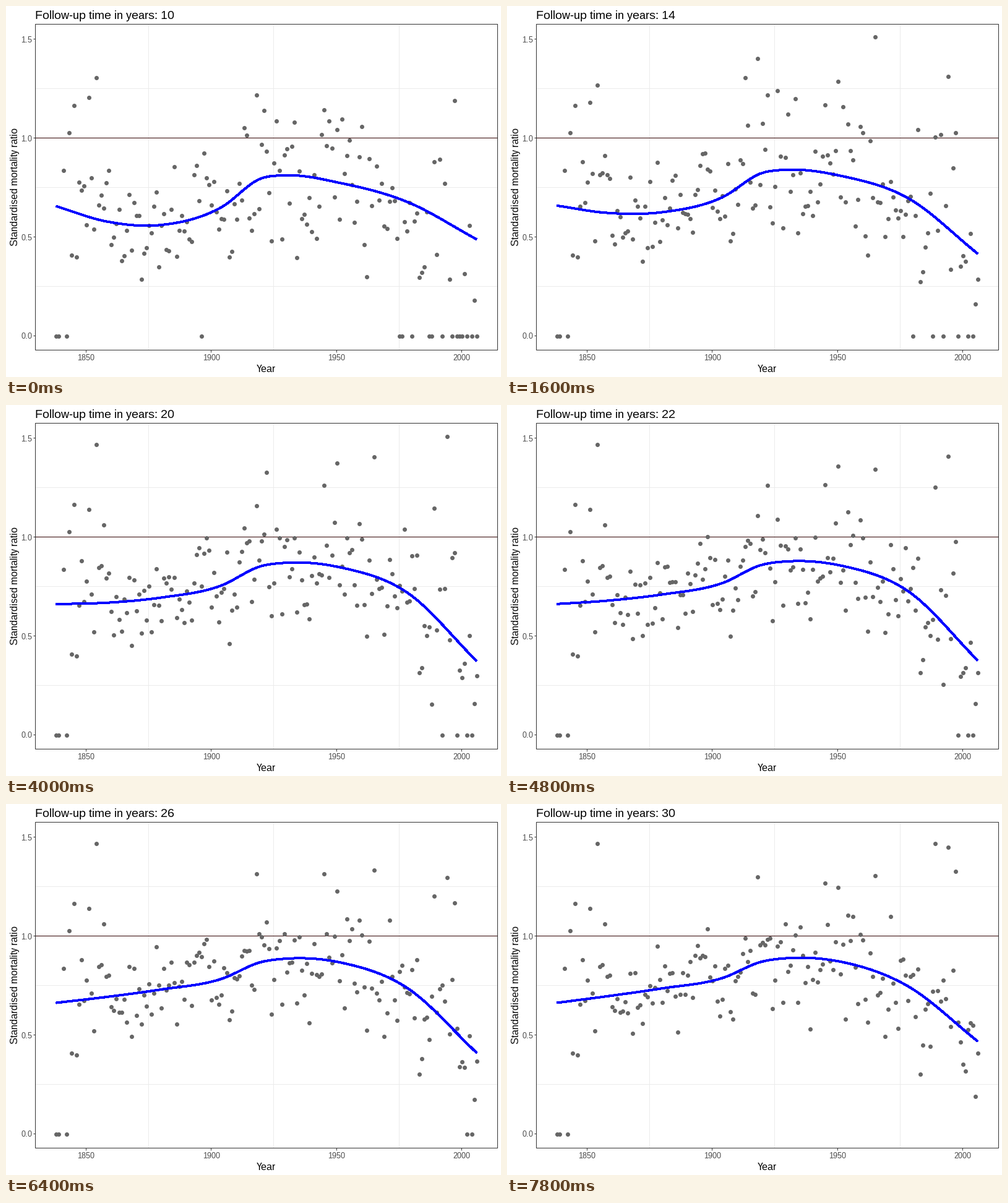
A matplotlib script that plays this animation: 800 px wide and 600 px high, repeating every 8 s.

```python
import matplotlib.pyplot as plt
import numpy as np
from matplotlib.animation import FuncAnimation
from matplotlib.patches import Rectangle

W, H, DPI = 800, 600, 100
PX = 72 / DPI                      # one pixel in points
FRAMES, INTERVAL = 40, 200
FIRST, LAST = 10, 30               # follow-up time in years
LEFT, RIGHT, TOP, BOTTOM = 47, 794, 29, 556

# Key points of the smoothed ratio at the first and last follow-up time
KNOTS = np.array([1838, 1858, 1880, 1904, 1920, 1930, 1952, 1978, 2006])
START = np.array([0.655, 0.578, 0.56, 0.649, 0.796, 0.811, 0.771, 0.678, 0.487])
END = np.array([0.662, 0.695, 0.735, 0.787, 0.871, 0.888, 0.868, 0.747, 0.467])

# Cohorts that stand out, and cohorts that begin without any deaths
NOTABLE = {1838: 0, 1839: 0, 1842: 0, 1845: 1.167, 1851: 1.141, 1854: 1.471,
           1857: 1.064, 1918: 1.3, 1945: 1.27, 1989: 1.47, 1994: 1.45,
           1997: 1.33}
ZERO_BRIEFLY = (1896, 1975, 1976, 1987, 1996, 1999, 2000, 2006)
ZERO_LONG = (1980, 1988, 1992, 1998, 2002, 2004)


def to_x(year):
    return 129.4 + (np.asarray(year) - 1850) * 4.047


def to_y(ratio):
    return 533 - np.asarray(ratio) * 319.5


def trend(years, t):
    """Smoothed ratio at follow-up time t: a Hermite curve through the knots."""
    u = (t - FIRST) / (LAST - FIRST)
    v = START + (END - START) * (1 - (1 - u) ** 2)
    v -= 0.4 * u * (1 - u) * np.clip((KNOTS - 1975) / 31, 0, 1)
    slope = np.gradient(v, KNOTS)
    i = np.clip(np.searchsorted(KNOTS, years, "right") - 1, 0, len(KNOTS) - 2)
    h = KNOTS[i + 1] - KNOTS[i]
    s = (years - KNOTS[i]) / h
    return ((1 + 2 * s) * (1 - s) ** 2 * v[i] + s * (1 - s) ** 2 * h * slope[i]
            + s ** 2 * (3 - 2 * s) * v[i + 1]
            + s ** 2 * (s - 1) * h * slope[i + 1])


def at_time(states, t):
    k = min(int(t), LAST - 1)
    f = t - k
    return states[:, k - FIRST] * (1 - f) + states[:, k + 1 - FIRST] * f


def build_states():
    """Ratio of every cohort at each whole follow-up year."""
    rng = np.random.default_rng(12)
    years = np.array([y for y in range(1838, 2007) if y != 1840])
    ks = np.arange(FIRST, LAST + 1)

    # Final ratios scatter about the trend, most in the first and last cohorts
    scatter = np.interp(years, [1838, 1870, 1910, 1950, 2006],
                        [0.24, 0.12, 0.12, 0.18, 0.2])
    level = trend(years, LAST) + scatter * rng.normal(size=years.size)
    level = np.maximum(level, 0.14)
    for year, ratio in NOTABLE.items():
        level[years == year] = ratio

    # Ratios wander less as follow-up grows, and stop once a cohort has settled
    spread = np.where(years > 1975, 1.3, 0.9)
    drift = np.cumsum(rng.normal(size=(years.size, ks.size))
                      * spread[:, None] / ks, axis=1)
    drift += np.log([trend(years, k) for k in ks]).T
    stop = np.clip(np.round(14 + 0.9 * (years - 1850)), FIRST, LAST).astype(int)
    idx = np.minimum(ks, stop[:, None]) - FIRST
    drift = np.take_along_axis(drift, idx, axis=1)
    states = level[:, None] * np.exp(drift - drift[:, -1:])

    for year in ZERO_BRIEFLY:
        states[years == year, 0] = 0
    for year in ZERO_LONG:
        states[np.ix_(years == year, ks < 16 + 0.55 * (year - 1980))] = 0
    return years, states


years, states = build_states()
curve_years = np.linspace(1838, 2006, 80)

plt.rcParams.update({"font.family": "Liberation Sans",
                     "text.hinting": "native", "text.hinting_factor": 1})
fig = plt.figure(figsize=(W / DPI, H / DPI), dpi=DPI, facecolor="white")
ax = fig.add_axes([0, 0, 1, 1])
ax.set_xlim(0, W)
ax.set_ylim(H, 0)
ax.axis("off")


def vline(x, y0, y1, color, z):
    ax.plot([np.floor(x)] * 2, [y0, y1], color=color, lw=PX, zorder=z,
            solid_capstyle="butt")


def hline(y, x0, x1, color, z):
    ax.plot([x0, x1], [np.floor(y)] * 2, color=color, lw=PX, zorder=z,
            solid_capstyle="butt")


def label(x, y, text, size, color="black", **kw):
    return ax.text(x, y, text, fontsize=size * PX, color=color,
                   va="baseline", **kw)


for year in (1875, 1925, 1975):
    vline(to_x(year), TOP, BOTTOM, "#ebebeb", 1)
for ratio in (0.25, 0.75, 1.25):
    hline(to_y(ratio), LEFT, RIGHT, "#ebebeb", 1)
hline(to_y(1), LEFT, RIGHT, "#300000", 2)

for year in (1850, 1900, 1950, 2000):
    vline(to_x(year), BOTTOM, BOTTOM + 4, "#333333", 5)
    label(to_x(year), 573, str(year), 13, "#4d4d4d", ha="center")
for ratio in (0, 0.5, 1, 1.5):
    hline(to_y(ratio), LEFT - 3, LEFT, "#333333", 5)
    label(42.5, to_y(ratio) + 5.5, f"{ratio:.1f}", 13, "#4d4d4d", ha="right")

panel = Rectangle((LEFT, TOP), RIGHT - LEFT, BOTTOM - TOP, fill=False,
                  ec="#333333", lw=PX, zorder=5)
ax.add_patch(panel)
label(420, 592, "Year", 16, ha="center")
label(19, 293, "Standardised mortality ratio", 16, ha="center",
      rotation=90, rotation_mode="anchor")
title = label(47, 21, "", 19, ha="left")

dots = ax.scatter(to_x(years), to_y(states[:, 0]), s=(7 * PX) ** 2, lw=0,
                  color="#666666", antialiased=False, zorder=3)
dots.set_clip_path(panel)
curve, = ax.plot([], [], color="blue", lw=3 * PX, antialiased=False,
                 solid_capstyle="butt", zorder=4)


def draw(i):
    t = FIRST + (LAST - FIRST) * i / (FRAMES - 1)
    spots = np.column_stack([to_x(years), to_y(at_time(states, t))])
    dots.set_offsets(np.floor(spots) + 0.5)
    curve.set_data(to_x(curve_years), to_y(trend(curve_years, t)))
    title.set_text(f"Follow-up time in years: {round(t)}")
    return dots, curve, title


anim = FuncAnimation(fig, draw, frames=FRAMES, interval=INTERVAL,
                     init_func=lambda: draw(0), repeat=True, repeat_delay=0)
plt.show()
```
